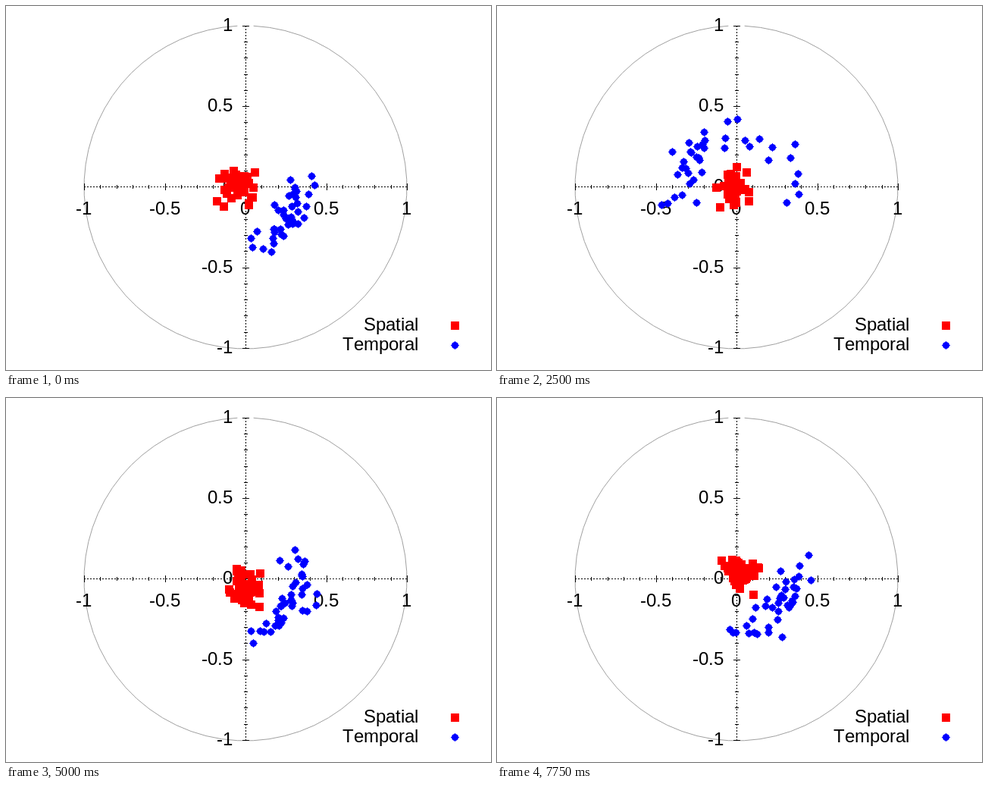
Write an HTML page with a canvas that moves like this. It is 640 by 480 pixels and loops after 8 s.

```html
<!DOCTYPE html>
<html lang="en">
<head>
<meta charset="utf-8">
<title>Spatial and temporal scatter</title>
<style>
html, body { margin: 0; width: 100%; height: 100%; overflow: hidden; background: #fff; }
canvas { display: block; }
</style>
</head>
<body>
<canvas id="stage" width="640" height="480"></canvas>
<script>
const ctx = document.getElementById('stage').getContext('2d');
const STEP = 250, STEPS = 32, COUNT = 40;

// Key poses: the blue arc runs from tail over mid to head (degrees, turning
// counterclockwise without wrapping); the red cloud sits around (x, y).
const poses = [
  { step: 0, tail: -85, mid: -33, head: 10, x: 305, y: 240 },
  { step: 5, tail: 72, mid: 120, head: 173, x: 318, y: 243 },
  { step: 10, tail: 343, mid: 497, head: 560, x: 312, y: 239 },
  { step: 14, tail: 710, mid: 754, head: 814, x: 317, y: 234 },
  { step: 20, tail: 997, mid: 1052, head: 1114, x: 317, y: 249 },
  { step: 24, tail: 1415, mid: 1451, head: 1536, x: 318, y: 240 },
  { step: 31, tail: 1703, mid: 1773, head: 1813, x: 321, y: 230 },
];

// Plot coordinates to pixels
const px = v => Math.round(316 + 213 * v);
const py = v => Math.round(238.4 - 212.5 * v);

function seeded(seed) {
  let s = seed * 7919 + 17;
  return () => {
    s = (s * 1664525 + 1013904223) % 4294967296;
    return s / 4294967296;
  };
}

function poseAt(step) {
  const next = Math.max(1, poses.findIndex(p => p.step >= step));
  const a = poses[next - 1], b = poses[next];
  const k = (step - a.step) / (b.step - a.step);
  const pose = {};
  for (const key in a) pose[key] = a[key] + (b[key] - a[key]) * k;
  return pose;
}

function square(x, y) {
  ctx.fillStyle = '#f00';
  ctx.fillRect(x - 5, y - 5, 11, 11);
}

function dot(x, y) {
  ctx.fillStyle = '#00f';
  ctx.beginPath();
  ctx.arc(x + 0.5, y + 0.5, 4.6, 0, 2 * Math.PI);
  ctx.fill();
  ctx.fillRect(x - 5, y, 11, 1);
  ctx.fillRect(x, y - 5, 1, 11);
}

function line(x1, y1, x2, y2) {
  ctx.beginPath();
  ctx.moveTo(x1, y1);
  ctx.lineTo(x2, y2);
  ctx.stroke();
}

// Places glyphs on whole pixels; anchor 0.5 centres the text, 1 aligns it right.
function label(text, x, y, anchor) {
  const advances = [...text].map(c => Math.round(ctx.measureText(c).width));
  const width = advances.reduce((sum, w) => sum + w, 0);
  let pen = Math.floor(x - anchor * width);
  [...text].forEach((c, i) => {
    ctx.fillText(c, pen, y);
    pen += advances[i];
  });
}

function drawPlot() {
  ctx.fillStyle = '#fff';
  ctx.fillRect(0, 0, 640, 480);
  ctx.lineWidth = 1;
  ctx.strokeStyle = '#a0a0a0';
  ctx.beginPath();
  ctx.arc(316, 239, 213, -Math.PI / 2 + 0.05, 1.5 * Math.PI - 0.05);
  ctx.stroke();

  const cx = px(0) + 0.5, cy = py(0) + 0.5;
  ctx.strokeStyle = ctx.fillStyle = '#000';
  ctx.setLineDash([2, 2]);
  line(px(-1), cy, px(1), cy);
  line(cx, py(1), cx, py(-1));
  ctx.setLineDash([]);

  ctx.font = '24px "Liberation Sans", Arial, sans-serif';
  for (let i = -10; i <= 10; i++) {
    const v = i / 10, x = px(v), y = py(v);
    const major = i % 5 === 0, half = major ? 4.5 : 2.5;
    line(x + 0.5, cy - half, x + 0.5, cy + half);
    line(cx - half, y + 0.5, cx + half, y + 0.5);
    if (major) {
      label(String(v), x, 275, 0.5);
      label(String(v), 299, y + 7, 1);
    }
  }
  label('Spatial', 544, 428, 1);
  label('Temporal', 544, 454, 1);
  square(592, 421);
  dot(592, 447);
}

function drawClouds(step) {
  const pose = poseAt(step), random = seeded(step + 1);
  const spread = () => random() + random() + random() - 1.5;

  for (let i = 0; i < COUNT; i++) {
    square(Math.round(pose.x + 22 * spread()), Math.round(pose.y + 22 * spread()));
  }
  for (let i = 0; i < COUNT; i++) {
    const u = 2 * i / (COUNT - 1) - 1;
    const end = u < 0 ? pose.tail : pose.head;
    const degrees = pose.mid + (end - pose.mid) * Math.abs(u) ** 1.4 + 6 * spread();
    const angle = degrees * Math.PI / 180, radius = 0.34 + 0.1 * spread();
    dot(px(radius * Math.cos(angle)), py(radius * Math.sin(angle)));
  }
}

let shown = -1;
function tick() {
  const step = Math.floor(performance.now() / STEP) % STEPS;
  if (step !== shown) {
    shown = step;
    drawPlot();
    drawClouds(step);
  }
  requestAnimationFrame(tick);
}
tick();
</script>
</body>
</html>
```
